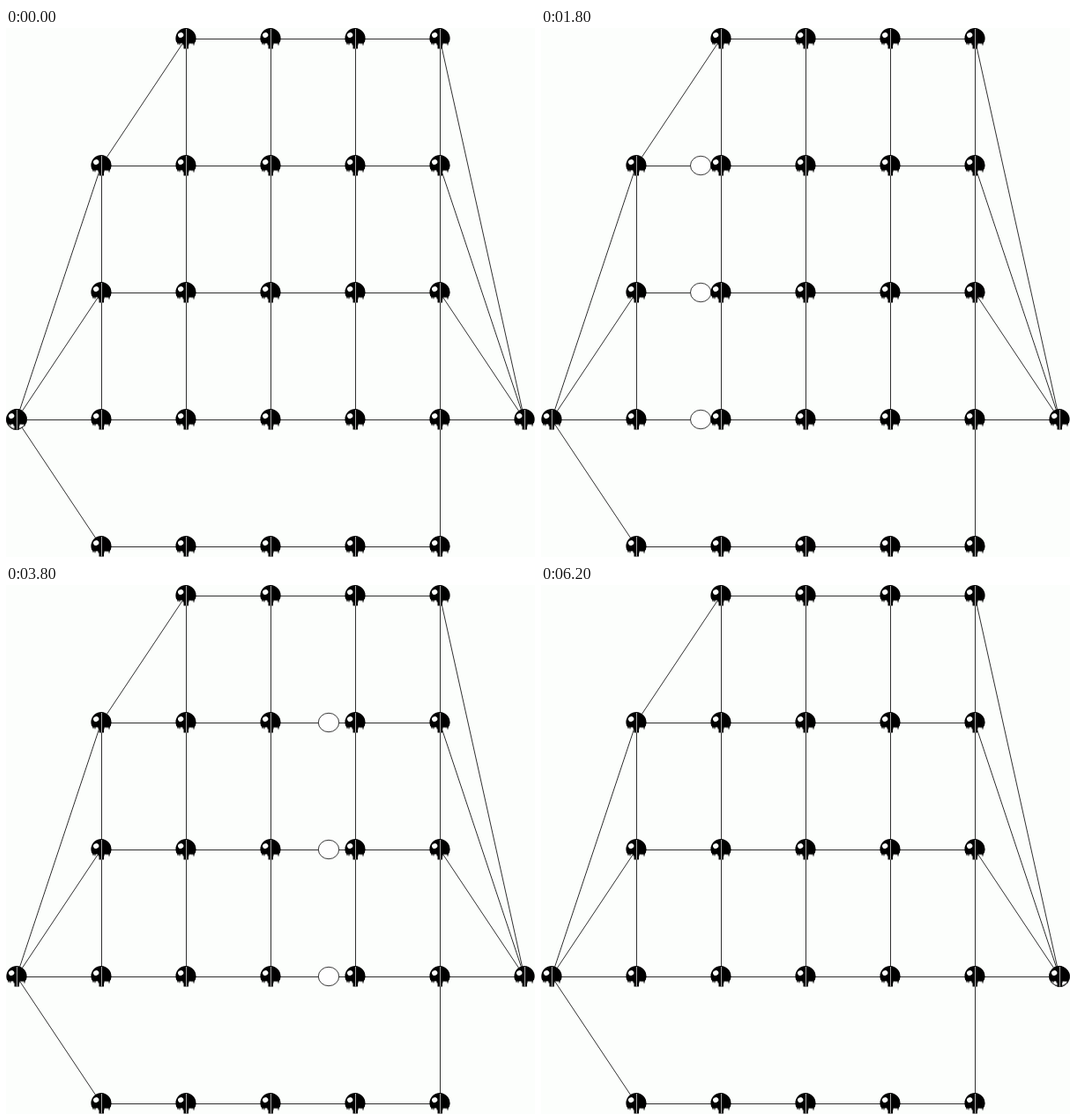
Animation of 600 by 600 pixels, one loop 6.25 s. Source, as an HTML page with a canvas:

```html
<!DOCTYPE html>
<html lang="en">
<head>
<meta charset="utf-8">
<title>Network flow</title>
<style>
html, body { margin: 0; width: 100%; height: 100%; overflow: hidden; background: #fcfefc; }
canvas { display: block; width: 600px; height: 600px; }
</style>
</head>
<body>
<canvas id="stage" width="600" height="600"></canvas>
<script>
const ctx = document.getElementById('stage').getContext('2d');
const LOOP = 6250, TICK = 50;
const MOVE = 20, LEG = 20.75; // ticks in motion and ticks per leg, including the pause
const PAPER = '#fcfefc';
const ROWS = 5, COLS = 7, HUB = 3; // the hub row holds both end nodes

// Grid cells to pixels
const px = c => 12 + 96 * c;
const py = r => 12 + 144 * r;

// First and last occupied column of a row
const first = r => r === HUB ? 0 : r === 0 ? 2 : 1;
const last = r => r === HUB ? COLS - 1 : COLS - 2;

// Straight edges sit on whole pixels, slanted ones on the node centres
function edge(c1, r1, c2, r2) {
  const shift = c1 === c2 || r1 === r2 ? 0.5 : 0;
  ctx.moveTo(px(c1) + shift, py(r1) + shift);
  ctx.lineTo(px(c2) + shift, py(r2) + shift);
}

function drawEdges() {
  ctx.strokeStyle = '#303030';
  ctx.lineWidth = 1;
  ctx.beginPath();
  for (let r = 0; r < ROWS; r++) {
    edge(first(r), r, last(r), r);
    if (r !== HUB && r > 0) edge(0, HUB, 1, r);
    if (r < HUB) edge(COLS - 1, HUB, COLS - 2, r);
  }
  for (let c = 1; c < COLS - 1; c++) {
    edge(c, c === 1 ? 1 : 0, c, c === COLS - 2 ? ROWS - 1 : HUB);
  }
  edge(1, 1, 2, 0);
  ctx.stroke();
}

// A ball whose underside ends in a row of drips
function makeBall() {
  const path = new Path2D();
  path.arc(0, -0.3, 11.6, Math.PI - 0.35, 0.35);
  for (let i = 0; i <= 20; i++) {
    const drip = i % 2 ? 7.2 + 1.3 * Math.sin(i * 2) : 4.8;
    path.lineTo(10 - i, drip);
  }
  path.closePath();
  path.rect(-2.5, 4, 5.5, 7.5);
  return path;
}
const ball = makeBall();

function drawBall(x, y) {
  ctx.save();
  ctx.translate(x, y);
  ctx.fillStyle = '#000';
  ctx.fill(ball);
  ctx.fillStyle = PAPER;
  ctx.beginPath();
  ctx.ellipse(-5.8, -4, 3.2, 2.8, -0.5, 0, 7);
  ctx.fill();
  ctx.fillStyle = '#aaa';
  ctx.fillRect(0, -11, 1, 22.5);
  ctx.restore();
}

function drawToken(x, y, angle) {
  ctx.beginPath();
  ctx.ellipse(x, y, 11.7, 10.7, angle, 0, 7);
  ctx.fillStyle = '#fff';
  ctx.fill();
  ctx.strokeStyle = '#222';
  ctx.lineWidth = 0.9;
  ctx.stroke();
}

// Tokens fan out from the left end, cross the grid and meet at the right end
function drawTokens(tick) {
  const end = COLS - 2;
  const leg = Math.min(end, Math.floor(tick / LEG));
  const p = Math.min(1, (tick - leg * LEG) / MOVE);
  for (let row = 1; row <= HUB; row++) {
    const from = leg === 0 ? HUB : row;
    const to = leg === end ? HUB : row;
    const angle = Math.atan2(py(to) - py(from), px(1) - px(0));
    drawToken(px(leg + p), py(from + (to - from) * p), angle);
  }
}

function frame() {
  ctx.fillStyle = PAPER;
  ctx.fillRect(0, 0, 600, 600);
  drawEdges();
  drawTokens(Math.floor(performance.now() % LOOP / TICK));
  for (let r = 0; r < ROWS; r++) {
    for (let c = first(r); c <= last(r); c++) drawBall(px(c), py(r));
  }
  requestAnimationFrame(frame);
}
frame();
</script>
</body>
</html>
```
